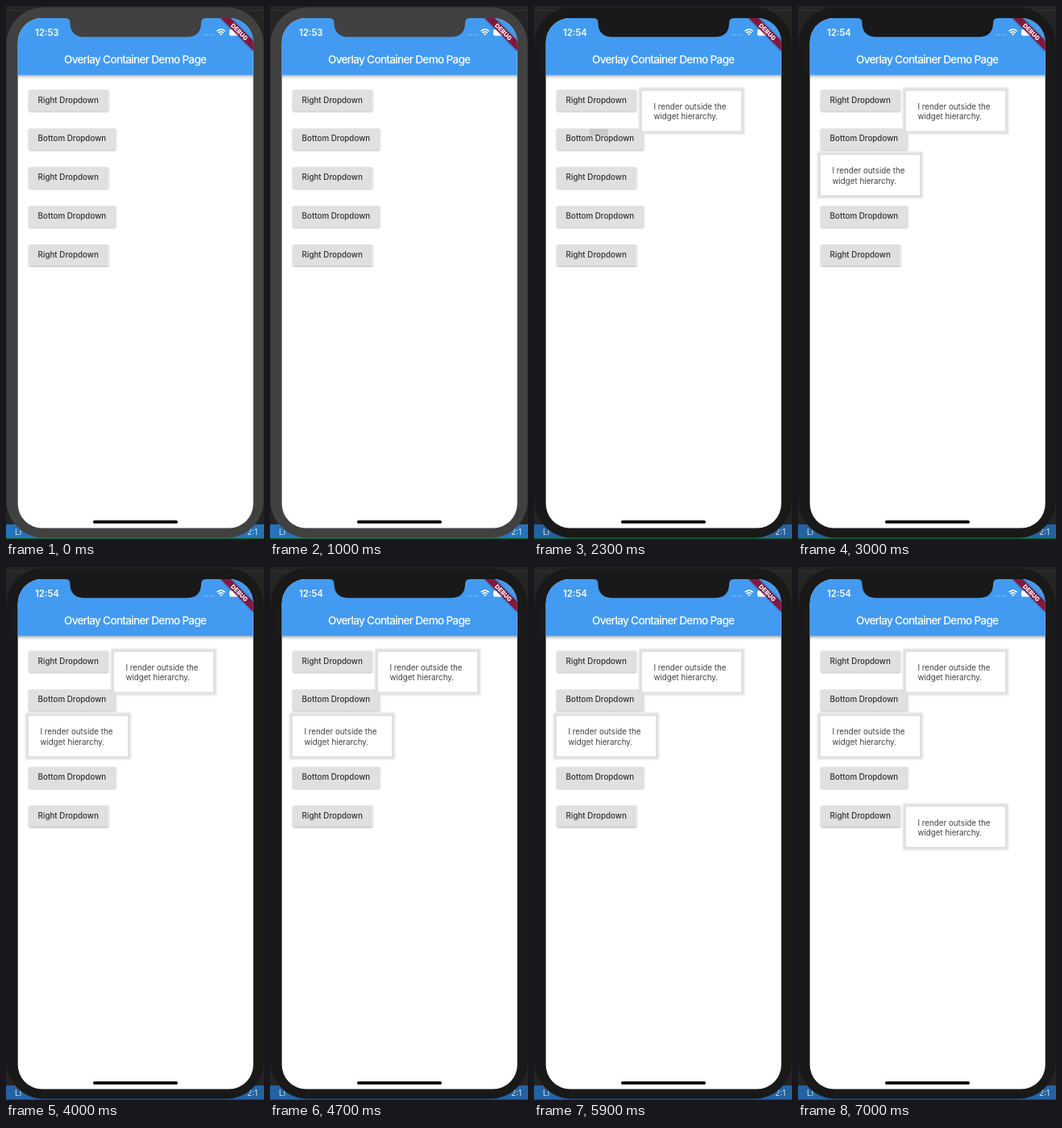
These frames come from a looping animation (320 px wide and 659 px high, 7.1 s). An HTML page:

```html
<!DOCTYPE html>
<html lang="en">
<head>
<meta charset="utf-8">
<title>Overlay demo</title>
<style>
  html, body { margin: 0; width: 100%; height: 100%; overflow: hidden; background: #242424; }
  svg { display: block; width: 320px; height: 659px; }
  text { font-family: Inter, "Open Sans", sans-serif; }
  .title { font-size: 13.6px; font-weight: 500; letter-spacing: -.71px; fill: #fff; }
  .clock { font-size: 11.3px; font-weight: 600; fill: #fff; }
  .label { font-size: 9.8px; font-weight: 500; fill: #303030; }
  .note { font-size: 9.8px; fill: #404040; }
  .debug { font-size: 7.5px; font-weight: 800; fill: #fff; }
  .status { font-size: 10px; fill: #fff; fill-opacity: .8; }
</style>
</head>
<body>
<svg viewBox="0 0 320 659">
  <defs>
    <clipPath id="screen"><rect x="14.7" y="15" width="292" height="630.6" rx="30"/></clipPath>
    <linearGradient id="barShade" x2="0" y2="1">
      <stop stop-color="#000" stop-opacity=".34"/>
      <stop offset=".4" stop-color="#000" stop-opacity=".12"/>
      <stop offset="1" stop-color="#000" stop-opacity="0"/>
    </linearGradient>
    <filter id="lift" x="-10%" y="-30%" width="120%" height="170%">
      <feDropShadow dx="0" dy="1.1" stdDeviation=".9" flood-opacity=".32"/>
    </filter>
    <filter id="soft" x="-10%" y="-20%" width="120%" height="140%">
      <feGaussianBlur stdDeviation=".9"/>
    </filter>
  </defs>

  <rect width="320" height="659" fill="#242424"/>
  <rect y="5" width="320" height="1" fill="#333"/>
  <rect id="strip" y="641" width="320" height="17"/>
  <text class="status" x="11" y="654">Li</text>
  <text class="status" x="312" y="654" text-anchor="end">2:1</text>
  <rect y="658" width="320" height="1" fill="#0b5a26"/>

  <rect id="bezel" x=".5" y="1.5" width="319" height="656" rx="46"/>
  <g clip-path="url(#screen)">
    <rect x="14" y="14" width="293" height="633" fill="#fff"/>
    <rect x="14" y="85.3" width="293" height="5.5" fill="url(#barShade)"/>
    <rect x="14" y="14" width="293" height="71.3" fill="#429bf0"/>
    <text class="title" x="72" y="70.6">Overlay Container Demo Page</text>
    <text class="clock" id="clock" x="36" y="36.8"></text>

    <g fill="#fff" fill-opacity=".33">
      <circle cx="246" cy="35.7" r="1"/><circle cx="249.8" cy="35.7" r="1"/>
      <circle cx="253.6" cy="35.7" r="1"/><circle cx="257.4" cy="35.7" r="1"/>
    </g>
    <g fill="none" stroke="#fff" stroke-width="1.7">
      <path d="M261.6 31.2Q266.6 26.6 271.6 31.2"/>
      <path d="M263.5 33.3Q266.6 30.6 269.7 33.3"/>
    </g>
    <path d="M264.9 34.7Q266.6 33.3 268.3 34.7L266.6 36.6Z" fill="#fff"/>
    <rect x="277" y="28.7" width="15" height="8" rx="2" fill="#fff"/>
    <rect x="292.8" y="31.2" width="1.2" height="3" rx=".6" fill="#fff"/>

    <g transform="translate(289.5 32) rotate(45)">
      <rect x="-40" y="-5" width="80" height="10" fill="#000" opacity=".25" filter="url(#soft)"/>
      <rect x="-40" y="-4.4" width="80" height="8.8" fill="#80193f"/>
      <text class="debug" y="2.7" text-anchor="middle">DEBUG</text>
    </g>

    <g id="buttons"></g>
    <rect id="press" fill="#c9c9c9"/>
    <g id="labels"></g>
    <g id="notes"></g>
    <rect x="108" y="635.9" width="105" height="3.9" rx="1.9" fill="#000"/>
  </g>
  <path id="notch" d="M74 13V15Q79.5 15 79.5 21.2C79.5 32 86 38.3 97 38.3H224C236 38.3 242 32 242 21.2Q242 15 248 15V13Z"/>
</svg>
<script>
const LOOP = 7100, TICK = 100;
const el = id => document.getElementById(id);
const set = (node, attrs) => {
  for (const key in attrs) node.setAttribute(key, attrs[key]);
};

const buttonY = i => 103.6 + i * 47.85;
const buttons = ["Right", "Bottom", "Right", "Bottom", "Right"];
el("buttons").innerHTML = buttons.map((side, i) =>
  `<rect x="28.3" y="${buttonY(i)}" width="${side === "Bottom" ? 108 : 98.9}" height="26"
    rx="1.5" fill="#e0e0e0" filter="url(#lift)"/>`).join("");
el("labels").innerHTML = buttons.map((side, i) =>
  `<text class="label" x="39.6" y="${buttonY(i) + 16}">${side} Dropdown</text>`).join("");

// Each note: left, top, time it appears.
const notes = [[134, 105, 1500], [28, 184.3, 2600], [134, 296.5, 6000]];
el("notes").innerHTML = notes.map(([x, y]) =>
  `<g transform="translate(${x} ${y})">
    <rect x="-4" y="-4" width="131" height="57.5" fill="#e0e0e0" filter="url(#soft)"/>
    <rect width="123" height="49.5" fill="#fff"/>
    <text class="note" x="14.4" y="23.2">I render outside the</text>
    <text class="note" x="14.4" y="35.3">widget hierarchy.</text>
  </g>`).join("");
const noteNodes = [...el("notes").children];

const lerp = (a, b, p) => a + (b - a) * p;

function drawPress(t) {
  const p = (t - 2300) / 300;
  const shown = p >= 0 && p < 1;
  el("press").style.display = shown ? "" : "none";
  if (!shown) return;
  set(el("press"), {
    x: lerp(69, 28.3, p), y: lerp(152, buttonY(1), p),
    width: lerp(23, 108, p), height: lerp(8.5, 26, p),
    opacity: 1 - p
  });
}

function draw(now) {
  const t = Math.floor((now % LOOP) / TICK) * TICK;
  const lit = t < 1100;
  const body = lit ? "#414141" : "#191919";
  set(el("bezel"), { fill: body });
  set(el("notch"), { fill: body });
  set(el("strip"), { fill: lit ? "#2474bc" : "#2463a2" });
  el("clock").textContent = t < 1700 ? "12:53" : "12:54";
  notes.forEach(([, , start], i) => {
    noteNodes[i].style.display = t >= start ? "" : "none";
  });
  drawPress(t);
}

let begin;
function frame(now) {
  begin ??= now;
  draw(Math.max(0, now - begin));
  requestAnimationFrame(frame);
}
draw(0);
requestAnimationFrame(frame);
</script>
</body>
</html>
```
